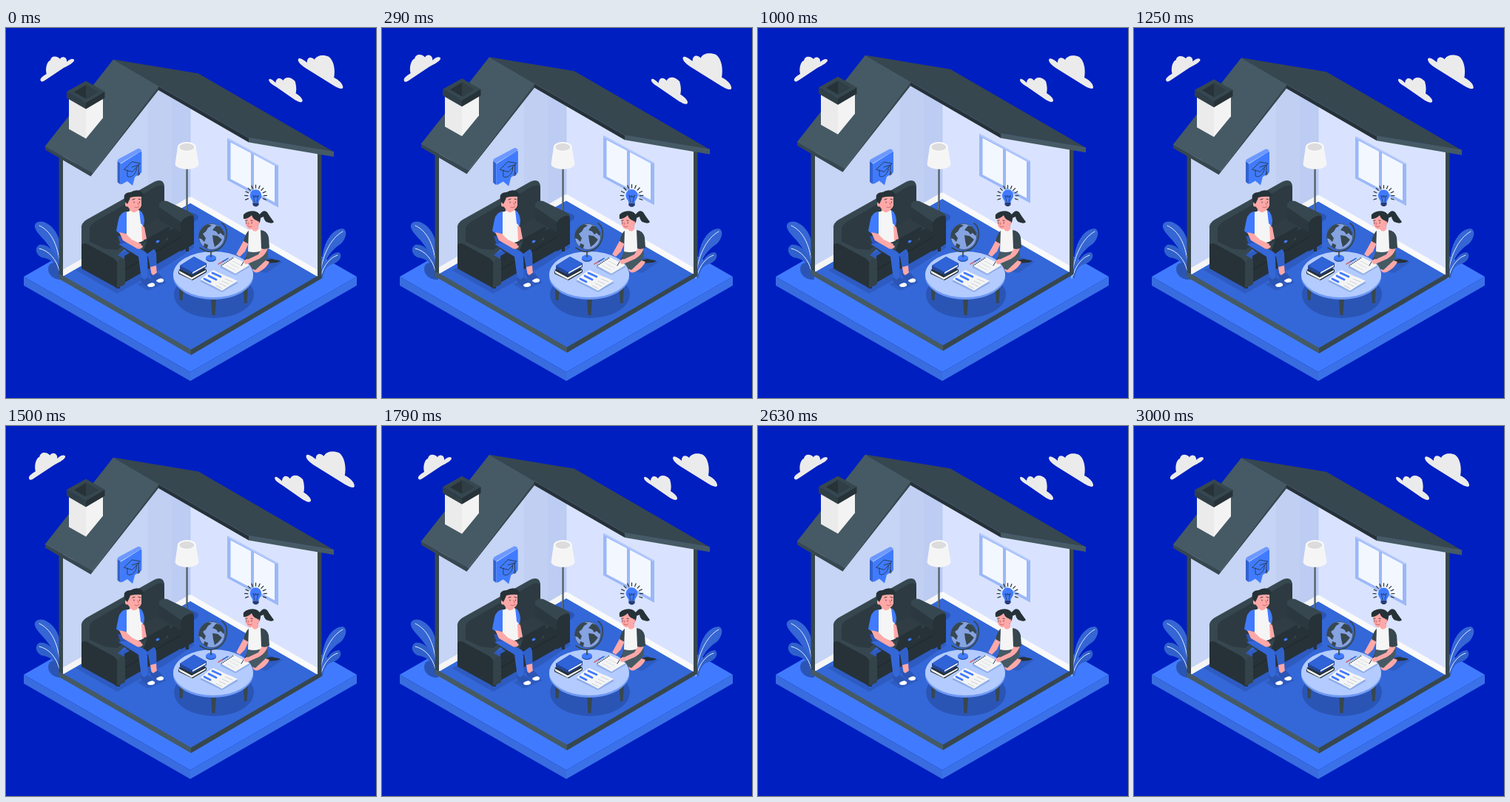
These frames come from a looping animation (500x500 px, 3.04 s). An HTML page:

```html
<!DOCTYPE html>
<html lang="en">
<head>
<meta charset="utf-8">
<title>Studying at home</title>
<style>
html, body { margin: 0; height: 100%; overflow: hidden; background: #001fc1; }
svg { display: block; width: 100vw; height: 100vh; }
.line { fill: none; stroke-linecap: round; stroke-linejoin: round; }
.ink { fill: #263238; }
.slate { fill: #37474f; }
.steel { fill: #455a64; }
.blue { fill: #407bff; }
.deep { fill: #3061cb; }
.shade { fill: #2b55b5; }
.white { fill: #f5f5f5; }
.skin { fill: #ffa8a7; }
</style>
</head>
<body>
<svg viewBox="0 0 500 500">
<defs>
  <clipPath id="sphere"><circle cx="278" cy="282" r="17.500"/></clipPath>
</defs>

<g id="clouds" fill="#ebebeb">
  <path d="M49 71C48 68 52 65 57 62C55 54 58 45 62 44C63 38 70 37 75 42C78 37 85 40 84 46C89 41 94 41 94 44C93 47 88 50 80 54L56 70C52 73 50 73 49 71Z"/>
  <path d="M393 43C394 39 400 43 405 47C405 39 411 39 415 43C418 37 427 36 434 39C441 44 443 57 441 67C447 70 453 75 453 80C453 84 446 81 441 78L404 55C398 51 393 47 393 43Z"/>
  <path d="M354 70C355 67 359 70 363 74C364 66 370 67 373 71C376 65 384 66 389 72C391 79 391 84 390 88C395 91 399 95 399 98C398 102 393 99 389 97L363 79C358 76 354 73 354 70Z"/>
</g>

<g id="plate">
  <path class="blue" d="M24 336L249 207L474 336L249 465Z"/>
  <path fill="#386cdf" d="M24 336L249 465V477L24 348Z"/>
  <path fill="#3a71e8" d="M474 336L249 465V477L474 348Z"/>
</g>

<g id="plants">
  <path fill="#3566d4" d="M74 316C77 290 69 269 51 262C43 260 36 264 40 272C46 284 61 290 70 320Z"/>
  <path class="deep" d="M73 326C71 306 57 290 45 293C38 297 40 306 48 310C60 312 66 316 71 330Z"/>
  <path class="shade" d="M76 340C63 341 54 331 58 321C63 314 70 318 76 324Z"/>
  <path class="line" stroke="#e4ebff" d="M45 267C60 274 69 290 73 318M45 298C58 301 68 312 72 328"/>
  <path fill="#3566d4" d="M427 322C426 295 438 272 455 271C462 273 460 285 452 292C440 300 432 310 428 328Z"/>
  <path class="deep" d="M426 338C429 315 440 303 450 303C456 308 450 317 441 319C432 322 429 330 428 338Z"/>
  <path class="line" stroke="#e4ebff" d="M424 338C426 310 438 284 455 275M426 334C430 319 439 310 448 307"/>
</g>

<g id="house">
  <path fill="#3468d8" d="M249 237L424 337L250 437L75 336Z"/>
  <path fill="#c6d4f5" d="M77 170L114 199L206 82L249 106V237L77 336Z"/>
  <path fill="#c1cff3" d="M192 100L206 82L249 106V237L192 270Z"/>
  <path fill="#bdccf2" d="M224 92L249 106V237L224 251Z"/>
  <path fill="#d9e3ff" d="M249 106L328 152L422 170V337L249 237Z"/>
  <path class="white" d="M77 327L249 228V237L77 336Z"/>
  <path fill="#fafafa" d="M249 228L422 328V337L249 237Z"/>
  <path class="line" stroke="#b4c5f1" stroke-width=".7" d="M249 107V229"/>
  <path fill="#9bb8f7" d="M299 149L368 186V243L299 206Z"/>
  <path fill="#b5caff" d="M301 149.500L368 186L366 187L299 151Z"/>
  <path fill="#f3f7ff" d="M303.500 155L331 169.500V219L303.500 204.500ZM335 171.500L363 186.500V236L335 221.500Z"/>
  <path class="slate" d="M71.500 172L77 174V336L71.500 339Z"/>
  <path class="slate" d="M421 168H426.500V338L421 335Z"/>
  <path class="steel" d="M71.500 333L77 335L250 435V442.500L71.500 339.500Z"/>
  <path class="slate" d="M426.500 333L421 335.500L250 435V442.500L426.500 339Z"/>

  <path class="steel" d="M145 43L207 79L117 196L53 160Z"/>
  <path class="slate" d="M53 160L117 196L206 79V84.500L114.500 201L53 165Z"/>
  <path class="slate" d="M145 43L260 62L443 168L328 149L206 79Z"/>
  <path class="ink" d="M206 79L328 149V155L206 84.500Z"/>
  <path class="steel" d="M328 149L443 168V174.500L328 155Z"/>
  <path class="line" stroke="#586b74" stroke-width=".6" d="M53 160L117 196L206 79L328 149L443 168"/>

  <path fill="#ebebeb" d="M85 95L108 108V150L85 137Z"/>
  <path fill="#f3f3f3" d="M108 108L131 95V122L108 150Z"/>
  <path class="slate" d="M82 86.500L108 72L133.500 86.500L108 101.500Z"/>
  <path fill="#303f46" d="M82 86.500L108 101.500V110L82 95Z"/>
  <path class="ink" d="M133.500 86.500L108 101.500V110L133.500 95Z"/>
  <path class="ink" d="M92 87L108 77.500L124 87L108 96Z"/>
  <path fill="#303f46" d="M108 77.500L124 87L108 96Z"/>
</g>

<g id="shadows" class="shade">
  <ellipse cx="249" cy="256" rx="11" ry="6.500"/>
  <ellipse cx="281" cy="360" rx="54" ry="32"/>
  <path d="M94 327L150 359L215 323L255 296L232 275Z" opacity=".65"/>
  <path d="M177 346L192 355L217 344L205 335ZM322 325L352 331L374 316L350 308Z" opacity=".6"/>
</g>

<g id="lamp">
  <path class="line" stroke="#37474f" stroke-width="2.200" d="M244.500 188V251"/>
  <path class="line" stroke="#9caab1" stroke-width=".6" d="M244 190V250"/>
  <path class="white" d="M232 160L228.500 184C230 193 259 193 260.500 184L256.500 160Z"/>
  <ellipse cx="244.300" cy="160.500" rx="12.200" ry="6.500" fill="#fafafa"/>
  <ellipse cx="244.300" cy="161" rx="10" ry="5" fill="#dcdcdc"/>
</g>

<g id="sofa">
  <path class="ink" d="M147 346H154V352H149ZM242 296H247V302H243Z"/>
  <path class="slate" d="M102 320V270Q102 263 109 259L200 208Q212 202 214 213V250L150 308Z"/>
  <path fill="#2d3a41" d="M113 296V273Q113 266 120 262L203 214Q213 209 214 218V256L150 300Z"/>
  <path fill="#303d44" d="M147 288L219 250L242 263L170 307Z"/>
  <path fill="#263238" d="M160 308L241 263V298L160 344Z"/>
  <path class="line" stroke="#1d272c" d="M160 327L241 280"/>
  <path class="slate" d="M207 237Q211 232 218 234L249 249Q255 252 254 258L239 267L207 249Z"/>
  <path class="ink" d="M236 264Q238 258 245 255Q254 251 254 258V292L236 302Z"/>
  <path fill="#2b383f" d="M207 242L236 262V276L207 259Z"/>
  <path class="slate" d="M102 294Q105 288 114 289L155 309Q161 312 161 318V324L150 322L102 304Z"/>
  <path class="ink" d="M102 294Q103 289 110 292L145 311Q151 315 151 321V352L102 325Z"/>
  <path fill="#344249" d="M150 352V322Q151 313 157 311Q161 311 161 317V346Z"/>
  <path class="line" stroke="#43545c" stroke-width=".6" d="M102 269Q103 263 110 259L203 207"/>
</g>

<g id="bubble">
  <path fill="#3262cc" d="M151 180L155 183V211L151 208Z"/>
  <path fill="#6d99ff" d="M151 180Q151 178 153 177L178 163.500Q181 163 183 166L155 183Z"/>
  <path class="blue" d="M155 184L181 167.500Q183 166 183 169V193Q183 196 180 197.500L174 201L171 212.500L164 206.500L157 210.500Q155 211 155 209Z"/>
  <path class="line" stroke="#263238" stroke-width=".8" d="M160 191L170 181L181 183L171 194ZM164 192V200C169 203 174 198 176 192V188M170 188L179 185V195M179 195L178 199L180 198Z"/>
</g>

<g id="boy">
  <path class="shade" d="M151 281L164 284L200 302L190 310L155 293Z"/>
  <path class="deep" d="M174 293L195 296Q203 299 203 305L204 329L196 331L192 309L178 303Z"/>
  <path fill="#3467d7" d="M164 290L181 296Q190 300 191 311L192 338L183 339L179 309L152 292Z"/>
  <path class="skin" d="M195 323L203 321L204 334L197 335Z"/>
  <path class="shade" d="M182 336L187 340L192 336L201 345Q202 350 195 350Q184 348 182 341ZM195 331L199 334L205 330L213 339Q214 344 207 344Q197 341 195 336Z"/>
  <path fill="#fff" d="M191 347Q198 342 201 346Q202 350 195 350Q191 350 191 347ZM203 341Q210 336 213 340Q214 344 207 344Q203 343 203 341Z"/>
  <path class="skin" d="M167 240H179V251L172 254L167 251Z"/>
  <path class="white" d="M161 249L169 247Q173 252 179 246L184 250L186 287Q174 294 163 288Z"/>
  <path class="blue" d="M163 248Q154 249 152 259L149 274Q154 280 163 277ZM180 246Q186 249 187 260L186 268L182 264Z"/>
  <path class="skin" d="M153 276L162 278L170 286L183 292Q183 298 177 298L158 287ZM183 267L187 269L190 285L184 287Z"/>
  <path class="skin" d="M163 228Q162 244 171 247Q180 248 183 240V225L167 222Z"/>
  <ellipse class="skin" cx="163.500" cy="238" rx="2.500" ry="3.500"/>
  <path class="ink" d="M164 238Q158 233 160 226Q162 222 168 222Q177 217 183 221Q187 225 184 228Q176 227 168 229Q167 232 164 238Z"/>
  <path class="line" stroke="#263238" stroke-width=".9" d="M171 232L174 231M179 231L182 232M173 235V236M180.500 235V236"/>
  <path class="line" stroke="#b6585b" stroke-width=".8" d="M174 242Q178 244 180 241M178 236L179 239"/>
  <path class="slate" d="M176 296L210 279L220 285L191 304Z"/>
  <path class="ink" d="M186 300L192 284L219 269Q222 268 221 271L216 287L191 305Z"/>
  <path class="skin" d="M169 291L178 290L185 295Q183 300 177 298Z"/>
  <ellipse class="blue" cx="205" cy="288.500" rx="2.600" ry="1.700" transform="rotate(-30 205 288.500)"/>
</g>

<g id="girl">
  <path class="ink" d="M350 314L359 312Q367 314 370 314Q371 316 365 317L353 318Z"/>
  <path class="skin" d="M333 325L348 313L356 316Q352 325 341 330Q334 332 333 325Z"/>
  <path class="steel" d="M327 299L351 296Q357 304 351 314L337 327L321 321Z"/>
  <path class="skin" d="M323 284L329 288L323 302L316 309L311 306Z"/>
  <path class="slate" d="M329 273Q324 276 321 288L328 292L332 283Z"/>
  <path class="white" d="M328 273L336 271L346 273L349 299Q339 305 327 302Z"/>
  <path class="skin" d="M333 264H341V272Q337 277 333 273ZM347 296L354 297Q351 307 342 312L326 319L322 315L341 306Z"/>
  <path class="slate" d="M344 273Q353 274 355 283L356 297Q350 300 345 298Z"/>
  <path class="ink" d="M342 253Q348 244 353 249Q356 254 362 262Q360 265 355 263Q349 262 348 255L343 257Z"/>
  <path class="skin" d="M323 255Q322 270 330 272Q340 272 342 264V252L330 249Z"/>
  <path class="ink" d="M321 258Q319 250 328 248Q340 245 344 254Q345 261 340 267L339 260Q334 259 332 253Q327 258 321 258Z"/>
  <ellipse class="skin" cx="340" cy="263.500" rx="2" ry="2.800"/>
  <path class="line" stroke="#263238" stroke-width=".9" d="M325 263V264M332 263V264M324 260.500L326 260M331 260L333 260.500"/>
  <path class="line" stroke="#b6585b" stroke-width=".8" d="M327 268Q330 270 332 268M328 263L327 266"/>
</g>

<g id="bulb">
  <path class="blue" d="M333.500 236C333.500 232 330 231 330 226A7.500 7.500 0 0 1 345 226C345 231 341.500 232 341.500 236Z"/>
  <path fill="#263c78" d="M333.500 236H341.500V239L339 241H336L333.500 239Z"/>
  <path class="line" stroke="#263238" stroke-width=".7" d="M336 235L334 226L336.500 229L337.500 226L338.500 229L341 226L339 235"/>
  <path id="rays" class="line" stroke="#263238" stroke-width="1.200"/>
</g>

<g id="table">
  <path class="slate" d="M233.500 348H240L238.500 368H235ZM277 365H284L282.500 388H278.500ZM320.500 350H327L325.500 372H322Z"/>
  <path fill="#6f99f4" d="M226 333V338C228 353 250 367 280 367S332 353 334 338V333Z"/>
  <ellipse cx="280" cy="333" rx="54" ry="31" fill="#b3cbff"/>

  <ellipse class="shade" cx="277" cy="312" rx="7" ry="4"/>
  <ellipse class="blue" cx="277" cy="310.500" rx="7" ry="4"/>
  <path class="line" stroke="#37474f" stroke-width="1.700" d="M277 309V302M292 264C304 272 299 299 279 302Q270 303 262 297"/>
  <circle cx="278" cy="282" r="17.500" fill="#86a3e2"/>
  <g class="slate" clip-path="url(#sphere)">
    <path d="M261 276L265 268L273 265L278 267L273 270L270 275L266 278L270 284L268 289L264 285L260 284Z"/>
    <path d="M284 267L291 269L296 277L294 281L290 277L287 279L284 275L279 273Z"/>
    <path d="M279 280L286 281L292 286L287 292L282 296L280 288Z"/>
    <path d="M268 291L273 293L272 298L267 296Z"/>
  </g>
  <circle class="line" cx="278" cy="282" r="17.500" stroke="#37474f" stroke-width=".7"/>

  <path class="ink" d="M233 329L252 318L271 327V330L252 341L233 332Z"/>
  <path class="white" d="M234 328L251 337L270 327V329L251 340L234 331Z"/>
  <path class="ink" d="M233 327L251 317L271 326L251 337Z"/>
  <path fill="#234694" d="M235 321L254 309L271 318V323L252 334L235 326Z"/>
  <path class="white" d="M252 330L270 320V322L252 332Z"/>
  <path fill="#2f63d8" d="M235 321L254 309L271 318L252 330Z"/>

  <path fill="#8faee8" d="M263 341L280 328L313 343V345L292 357L263 343Z"/>
  <path class="white" d="M263 340Q270 333 280 327L297 335L279 348ZM279 348L297 335Q306 338 313 342Q302 348 292 355Z"/>
  <path class="line" stroke="#407bff" stroke-width="2.800" stroke-linecap="butt" d="M268 339L276 343M274 335L284 340M279 331L290 336"/>
  <path class="line" stroke="#b5bfc9" stroke-width=".7" d="M284 348L292 352M288 345L297 349M292 342L301 346M296 339L306 343"/>

  <path fill="#8faee8" d="M290 322L308 310L329 321V323L310 334L290 324Z"/>
  <path class="white" d="M290 321L308 309.500L329 320.500L310 332Z"/>
  <path class="line" stroke="#37474f" stroke-width="1.300" stroke-dasharray=".6 2" d="M291 321L308 310"/>
  <path class="line" stroke="#c3ccd5" stroke-width=".6" d="M298 321L309 327M302 318L314 324M306 315L318 321"/>
  <path class="line" stroke="#d95f66" stroke-width="1.500" d="M287 319L293 315.500"/>
  <path class="line" stroke="#3061cb" stroke-width="1.500" d="M293 315.500L300 311.300"/>
  <path class="line" stroke="#263238" d="M318 321L325 310"/>
  <path class="skin" d="M320 315L326 312L330 316L324 319.500Z"/>
</g>
</svg>

<script>
const LOOP = 3040, FRAMES = 73, STEP = 1000 / 24, LEAD = 35, END = 3000;
const part = id => document.getElementById(id);

// Short strokes fanning out around the bulb
let rays = "";
for (let a = -200; a <= 20; a += 22) {
  const point = r => {
    const q = a * Math.PI / 180;
    return `${337.5 + r * Math.cos(q)} ${227 + r * Math.sin(q)}`;
  };
  rays += `M${point(10.5)}L${point(14.5)}`;
}
part("rays").setAttribute("d", rays);

// Two linear beats, then a rest
const beats = [[0, 1], [.1, 1.1], [.3, 1], [.4, 1], [.5, 1.1], [.6, 1], [1, 1]];
function heartbeat(time, period) {
  const p = time / period % 1;
  const i = beats.findIndex(b => b[0] > p);
  const [x0, y0] = beats[i - 1], [x1, y1] = beats[i];
  return y0 + (y1 - y0) * (p - x0) / (x1 - x0);
}

function scale(id, s, x, y) {
  part(id).setAttribute("transform", `translate(${x} ${y}) scale(${s}) translate(${-x} ${-y})`);
}

const start = performance.now();
function draw() {
  const elapsed = Math.max(0, performance.now() - start) % LOOP;
  const frame = Math.floor(elapsed * FRAMES / LOOP);
  const time = Math.min(END, LEAD + frame * STEP);
  const lift = 10 * (1 - Math.abs(time / 750 % 2 - 1));
  part("house").setAttribute("transform", `translate(0 ${-lift})`);
  scale("clouds", heartbeat(time, 3000), 251, 69.5);
  const pulse = heartbeat(time, 1500);
  scale("bubble", pulse, 167, 188.5);
  scale("bulb", pulse, 337.5, 227);
  requestAnimationFrame(draw);
}
draw();
</script>
</body>
</html>
```
